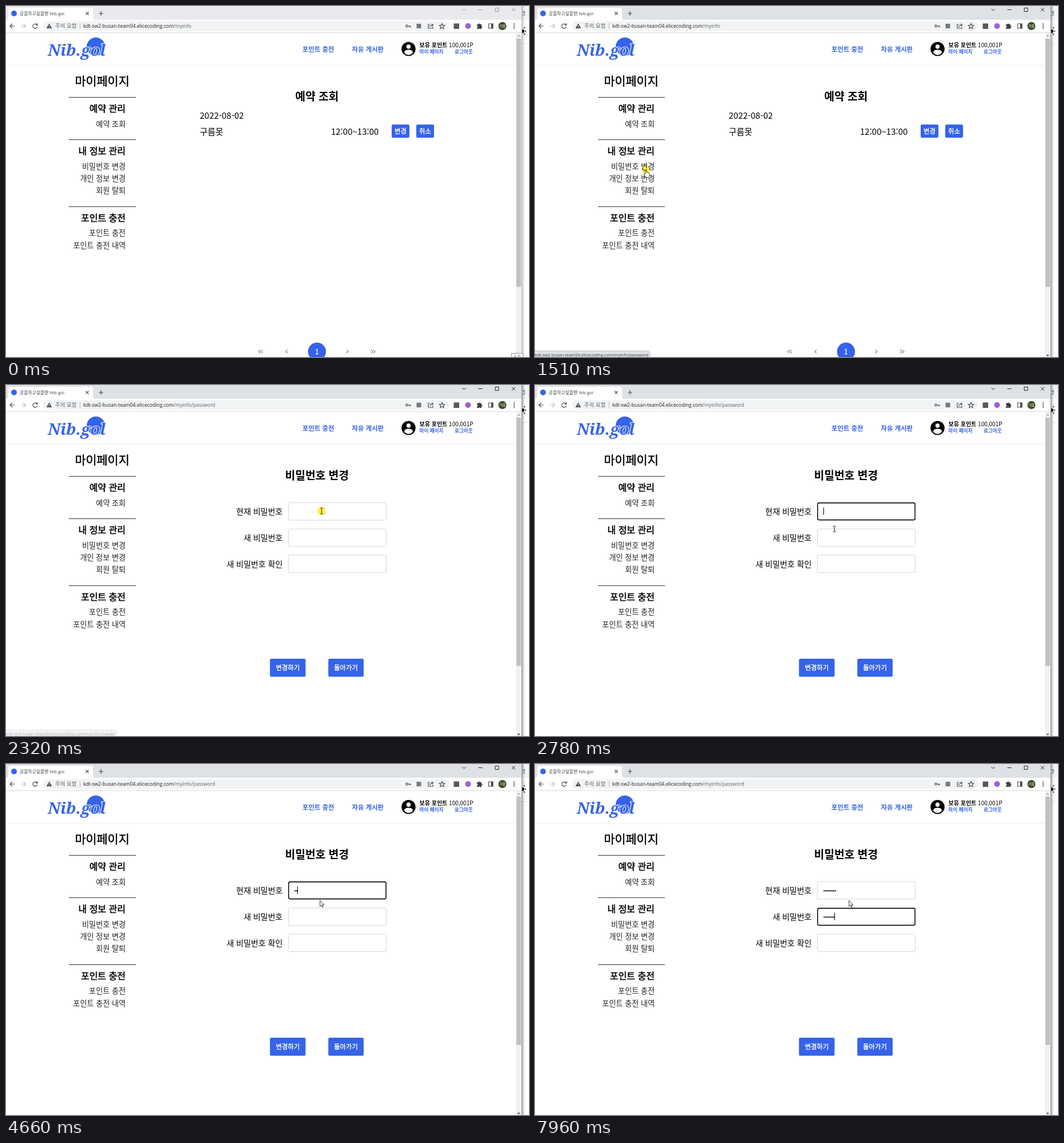
Animation, 914 px wide and 613 px high, one loop 8000 ms. Source, as an HTML page:

```html
<!DOCTYPE html>
<html lang="ko">
<head>
<meta charset="utf-8">
<title>비밀번호 변경</title>
<style>
html, body { margin: 0; width: 914px; height: 613px; overflow: hidden; background: #fff; }
svg { display: block; }
text { font-family: "Noto Sans CJK KR", "Noto Sans CJK", "Noto Sans KR", sans-serif; fill: #000; white-space: pre; }
.ui { font-family: "Open Sans", "Noto Sans CJK KR", "Noto Sans CJK", sans-serif; font-size: 8.57px; fill: #3c4043; }
/* a thin outline gives a medium weight */
.h1, .h3 { stroke: #000; stroke-width: .5px; }
.h1 { font-size: 20.7px; }
.h2 { font-size: 19.2px; font-weight: 700; text-anchor: middle; }
.h3 { font-size: 16px; text-anchor: end; }
.link { font-size: 13.1px; font-weight: 300; text-anchor: end; fill: #222; }
.row { font-size: 15px; }
.label { font-size: 14px; text-anchor: end; }
.blue { fill: #3563e9; }
.nav { font-size: 11.4px; font-weight: 700; fill: #3563e9; }
.sub { font-size: 8.6px; font-weight: 700; fill: #3563e9; }
.btn { font-size: 11.3px; fill: #fff; stroke: #fff; stroke-width: .35px; text-anchor: middle; }
.ico { fill: none; stroke: #4a4d51; stroke-width: 1.2; }
.page { fill: none; stroke: #8a8a8a; stroke-width: 1.2; }
</style>
</head>
<body>
<svg width="914" height="613" viewBox="0 0 914 613">
  <defs>
    <linearGradient id="shade"><stop stop-color="#000" stop-opacity=".28"/><stop offset="1" stop-color="#000" stop-opacity="0"/></linearGradient>
  </defs>

  <!-- window behind -->
  <path d="M902 0h12v24h-12z" fill="#f3f4f5"/>
  <path d="M902 65.5h12" stroke="#e6e6e6"/>
  <path class="ico" d="M902 10h4v6h-4M904 12l3-3" style="stroke:#888"/>
  <circle cx="903" cy="44" r="3" fill="#111"/>
  <path d="M905 39l2-2M907 44h2M905 48l2 2" stroke="#111" stroke-width="1.3"/>
  <rect id="shadow" x="902" width="5" height="613" fill="url(#shade)"/>

  <!-- browser frame -->
  <rect id="strip" width="901" height="24"/>
  <path d="M0 24q4 0 4-4V7q0-4 4-4h140q4 0 4 4v13q0 4 4 4v22.5H0z" fill="#fff"/>
  <path d="M0 24h901v22H0z" fill="#fff"/>
  <path d="M0 46.5h901" stroke="#d9dbde"/>
  <path id="edge" d="M901.5 0v613"/>
  <circle cx="14" cy="13" r="5" class="blue"/>
  <text class="ui" x="24" y="16" style="font-size:7.8px">공을차고싶을땐 Nib.gol</text>
  <path class="ico" d="M139.5 10.5l5 5m0-5l-5 5M162 13h8m-4-4v8"/>
  <g id="controls" fill="none"><path d="M797.5 5l3 3 3-3M825.5 6.5h7M855 3.5h6v6h-6zM884 3.5l6 6m0-6l-6 6"/></g>
  <path class="ico" d="M15 35H7m4-4l-4 4 4 4"/>
  <path class="ico" d="M26.5 35h8m-4-4l4 4-4 4" style="stroke:#bbbdc0"/>
  <path class="ico" d="M54 32.5a4 4 0 1 0 .8 3.6M55 30v3.3h-3.3"/>
  <rect x="65" y="26.5" width="710" height="17" rx="8.5" fill="#f1f3f4"/>
  <path d="M75.5 30.5l4.8 8.5h-9.6z" fill="#4a4d51"/>
  <path d="M75.5 33.5v2.5m0 1v1" stroke="#fff"/>
  <text class="ui" x="86" y="38.3" style="font-size:9.5px;fill:#5f6368">주의 요함</text>
  <path d="M129.5 30v10" stroke="#b5b8bc"/>
  <text class="ui" x="135" y="38" style="fill:#202124">kdt-sw2-busan-team04.elicecoding.com<tspan id="path" fill="#5f6368"></tspan></text>
  <path class="ico" d="M703 35h4v2m-2-2v2"/><circle class="ico" cx="700.5" cy="35" r="1.8"/>
  <rect x="717.5" y="31" width="8" height="8" fill="#777a7e"/>
  <path class="ico" d="M741 32h-3v7h8v-3M741 37q0-4 5-4m-2-2l2.5 2-2.5 2"/>
  <path class="ico" d="M762 30.5l1.3 3.2 3.4.2-2.6 2.2.9 3.3-3-1.8-3 1.8.9-3.3-2.6-2.2 3.4-.2z"/>
  <rect x="782.5" y="30.5" width="9.5" height="9.5" fill="#56595d"/>
  <circle cx="807.5" cy="35" r="5" fill="#9a62d3"/>
  <path d="M823 32h2.5a1.5 1.5 0 0 1 3 0h2.5v2.5a1.5 1.5 0 0 1 0 3V40h-3a1.5 1.5 0 0 0-2.5 0H823v-2.5a1.5 1.5 0 0 0 0-3z" fill="#3f4246"/>
  <path class="ico" d="M843.5 31h7.5v8h-7.5z"/><path d="M848 31h3v8h-3z" fill="#3f4246"/>
  <circle cx="867.5" cy="35" r="7" fill="#3b4a20"/>
  <text class="ui" x="867.5" y="37.3" text-anchor="middle" style="font-size:6px;fill:#fff">가람</text>
  <path d="M887 30.5h2v2h-2zm0 3.5h2v2h-2zm0 3.5h2v2h-2z" fill="#4a4d51"/>

  <!-- scrollbar -->
  <path d="M891 47h10v566h-10z" fill="#f1f1f1"/>
  <path d="M892 57h8v433.5h-8z" fill="#c1c1c1"/>
  <path d="M893.5 53.5l2.5-3 2.5 3z" fill="#a3a3a3"/>
  <path d="M893.5 609l2.5 3 2.5-3z" fill="#505050"/>

  <!-- site header -->
  <path d="M0 103.5h891" stroke="#ededed"/>
  <circle cx="157" cy="71" r="16" class="blue"/>
  <text class="blue" x="73" y="87" style="font:italic 700 28px 'Noto Serif',serif;paint-order:stroke;stroke:#fff;stroke-width:2px">Nib.gol</text>
  <text class="nav" x="518" y="80">포인트 충전</text>
  <text class="nav" x="604.5" y="80">자유 게시판</text>
  <circle cx="703.5" cy="75" r="12.3"/>
  <circle cx="703.5" cy="71" r="3.7" fill="#fff"/>
  <path d="M696 81.5q0-5 7.5-5t7.5 5q-3 4-7.5 4t-7.5-4z" fill="#fff"/>
  <text x="722.5" y="72.3" style="font-size:10px"><tspan font-weight="700">보유 포인트</tspan> 100,001P</text>
  <text class="sub" x="722.5" y="82.5">마이 페이지</text>
  <text class="sub" x="784" y="82.5">로그아웃</text>

  <!-- side menu -->
  <path d="M110 159.5h117M110 233.5h117M110 350.5h117" stroke="#333"/>
  <text class="h1" x="120.5" y="139">마이페이지</text>
  <g id="menu"></g>

  <g id="booking">
    <text class="h2" x="543.5" y="165">예약 조회</text>
    <text class="row" x="338.5" y="197">2022-08-02</text>
    <text class="row" x="338.5" y="225">구름못</text>
    <text class="row" x="568" y="225">12:00~13:00</text>
    <rect class="blue" x="674" y="207" width="31" height="23" rx="2.5"/>
    <rect class="blue" x="717" y="207" width="31" height="23" rx="2.5"/>
    <text class="btn" x="689.5" y="223">변경</text>
    <text class="btn" x="732.5" y="223">취소</text>
    <path class="page" d="M444.500 600.5l-3 3 3 3m4-6l-3 3 3 3M492 600.5l-3 3 3 3M595 600.5l3 3-3 3M638 600.5l3 3-3 3m4-6l3 3-3 3"/>
    <circle class="blue" cx="543.5" cy="603.5" r="15.7"/>
    <text class="btn" x="543.5" y="607.5">1</text>
  </g>

  <g id="form">
    <text class="h2" x="543.5" y="165">비밀번호 변경</text>
    <text class="label" x="483.5" y="226">현재 비밀번호</text>
    <text class="label" x="483.5" y="272">새 비밀번호</text>
    <text class="label" x="483.5" y="317.8">새 비밀번호 확인</text>
    <g id="fields"></g>
    <rect class="blue" x="461.3" y="478" width="62.2" height="31.5" rx="2.5"/>
    <rect class="blue" x="563.3" y="478" width="61.7" height="31.5" rx="2.5"/>
    <text class="btn" x="492.5" y="498.3">변경하기</text>
    <text class="btn" x="594" y="498.3">돌아가기</text>
  </g>

  <g id="status">
    <path id="statusBox" fill="#dee1e6" stroke="#c3c6ca"/>
    <text id="statusText" class="ui" x="0" y="611.5" style="font-size:7.37px"></text>
  </g>
  <g id="tip"><path d="M883.5 606.5h20v8h-20z" fill="#fff" stroke="#999"/><path d="M888 612h3m3-1h5" stroke="#555"/></g>

  <circle id="glow" r="7.5" fill="#fff04a" style="mix-blend-mode:multiply"/>
  <g id="cursor" stroke-linejoin="round">
    <path id="arrow" d="M.5.5v10.5l2.4-2.2 1.6 3.7 1.5-.7-1.6-3.5h3.3z" fill="#fff" stroke="#222" stroke-width=".9"/>
    <path id="beam" d="M-2.5-5h2l.5.5.5-.5h2M0-4.5v9M-2.5 5h2l.5-.5.5.5h2" fill="none" stroke="#222"/>
    <path id="hand" d="M-1 7V1q0-1.200 1-1.200T1 1v3.500q1.200-.6 1.800.3 1.200-.4 1.700.5 1.500-.2 1.500 1.200v3q0 2-1.200 4h-5Q-1.500 11-3.500 8.500q-.5-1.500.7-1.500z" fill="#fff" stroke="#222" stroke-width=".9"/>
  </g>
</svg>
<script>
const $ = id => document.getElementById(id);
const show = (id, on) => $(id).style.display = on ? '' : 'none';
const between = (t, a, b) => t >= a && t < b;

const MENU = [
  ['h3', 185, '예약 관리'], ['link', 210.5, '예약 조회'],
  ['h3', 259, '내 정보 관리'], ['link', 284.8, '비밀번호 변경'], ['link', 306, '개인 정보 변경'], ['link', 327.3, '회원 탈퇴'],
  ['h3', 376, '포인트 충전'], ['link', 401, '포인트 충전'], ['link', 422.8, '포인트 충전 내역']
];
$('menu').innerHTML = MENU.map(([c, y, s]) => `<text class="${c}" x="209" y="${y}">${s}</text>`).join('');

const FIELD_Y = [205.5, 251.5, 297];
const PITCH = 2.8;
const keys = [
  [4550, 4630, 4700, 4780, 5030, 5160, 5290, 5600],
  [7050, 7140, 7220, 7310, 7760, 7860, 7960]
];
// spans in which the text caret is lit
const carets = [
  [[2380, 2900], [3400, 3900], [4480, 6170]],
  [[6240, 6730], [7050, 8000]]
];

// time, x, y of the pointer
const track = [
  [60, 888, 612], [180, 720, 450], [320, 490, 235], [440, 345, 205], [600, 215, 217],
  [720, 171, 230], [800, 169, 242], [860, 173, 254], [1000, 183, 268], [1250, 194, 286],
  [1830, 194, 286], [1920, 206, 298], [2020, 310, 292], [2140, 470, 240], [2250, 551.5, 220],
  [2450, 551.5, 220], [2630, 526, 232], [2800, 523, 254], [3000, 522, 268], [3200, 522, 266],
  [3410, 522.5, 259], [3470, 530, 252], [3530, 535, 247], [3710, 548.3, 237.7]
];

function pointer(t) {
  const i = track.findIndex(p => p[0] > t);
  if (i < 0) return track[track.length - 1].slice(1);
  if (i === 0) return track[0].slice(1);
  const [a, b] = [track[i - 1], track[i]];
  const k = (t - a[0]) / (b[0] - a[0]);
  return [a[1] + (b[1] - a[1]) * k, a[2] + (b[2] - a[2]) * k];
}

function field(i, t, focus) {
  const y = FIELD_Y[i];
  const on = focus === i;
  const inset = on ? .4 : 0;
  const count = (keys[i] || []).filter(k => k <= t).length;
  let s = `<rect x="${493.5 + inset}" y="${y + inset}" width="${171 - 2 * inset}" height="${30.5 - 2 * inset}" rx="2.5" fill="#fff" stroke="${on ? '#101010' : '#d6d6d6'}" stroke-width="${on ? 1.6 : 1}"/>`;
  for (let n = 0; n < count; n++) s += `<circle cx="${505.4 + n * PITCH}" cy="${y + 16}" r="1.15"/>`;
  if (on && carets[i].some(([a, b]) => between(t, a, b)))
    s += `<rect x="${Math.floor(504 + count * PITCH)}" y="${y + 8.5}" width="1" height="13"/>`;
  return s;
}

function draw(t) {
  const active = t >= 1440;
  const changed = t >= 1570;
  $('strip').setAttribute('fill', active ? '#dee1e6' : '#e8eaed');
  $('controls').setAttribute('stroke', active ? '#222' : '#999');
  $('edge').setAttribute('stroke', active ? '#8b8d90' : '#b4b6b8');
  $('shadow').style.opacity = active ? 1 : .7;
  $('path').textContent = changed ? '/myinfo/password' : '/myinfo';
  show('booking', !changed);
  show('form', changed);
  const focus = t >= 6240 ? 1 : t >= 2380 ? 0 : -1;
  if (changed) $('fields').innerHTML = FIELD_Y.map((_, i) => field(i, t, focus)).join('');

  const second = t >= 1890;
  $('statusText').textContent = 'kdt-sw2-busan-team04.elicecoding.com/myinfo/' + (second ? 'change' : 'password');
  $('statusBox').setAttribute('d', `M-1 602.5H${second ? 190 : 198}q3 0 3 3V614H-1z`);
  $('status').style.opacity = between(t, 1080, 2420) ? Math.min(1, (t - 1080) / 120, (2420 - t) / 240) : 0;
  show('tip', t < 60);

  const [x, y] = pointer(t);
  const inField = changed && x > 493 && x < 665 && FIELD_Y.some(f => y > f && y < f + 31);
  const onLink = x > 130 && x < 209 && y > 270 && y < 332;
  show('cursor', t >= 60);
  show('beam', inField);
  show('hand', onLink);
  show('arrow', !inField && !onLink);
  for (const id of ['cursor', 'glow']) $(id).setAttribute('transform', `translate(${x} ${y})`);
  show('glow', between(t, 1440, 1640) || between(t, 2300, 2480));
}

function tick() {
  draw(performance.now() % 8000);
  requestAnimationFrame(tick);
}
tick();
</script>
</body>
</html>
```
